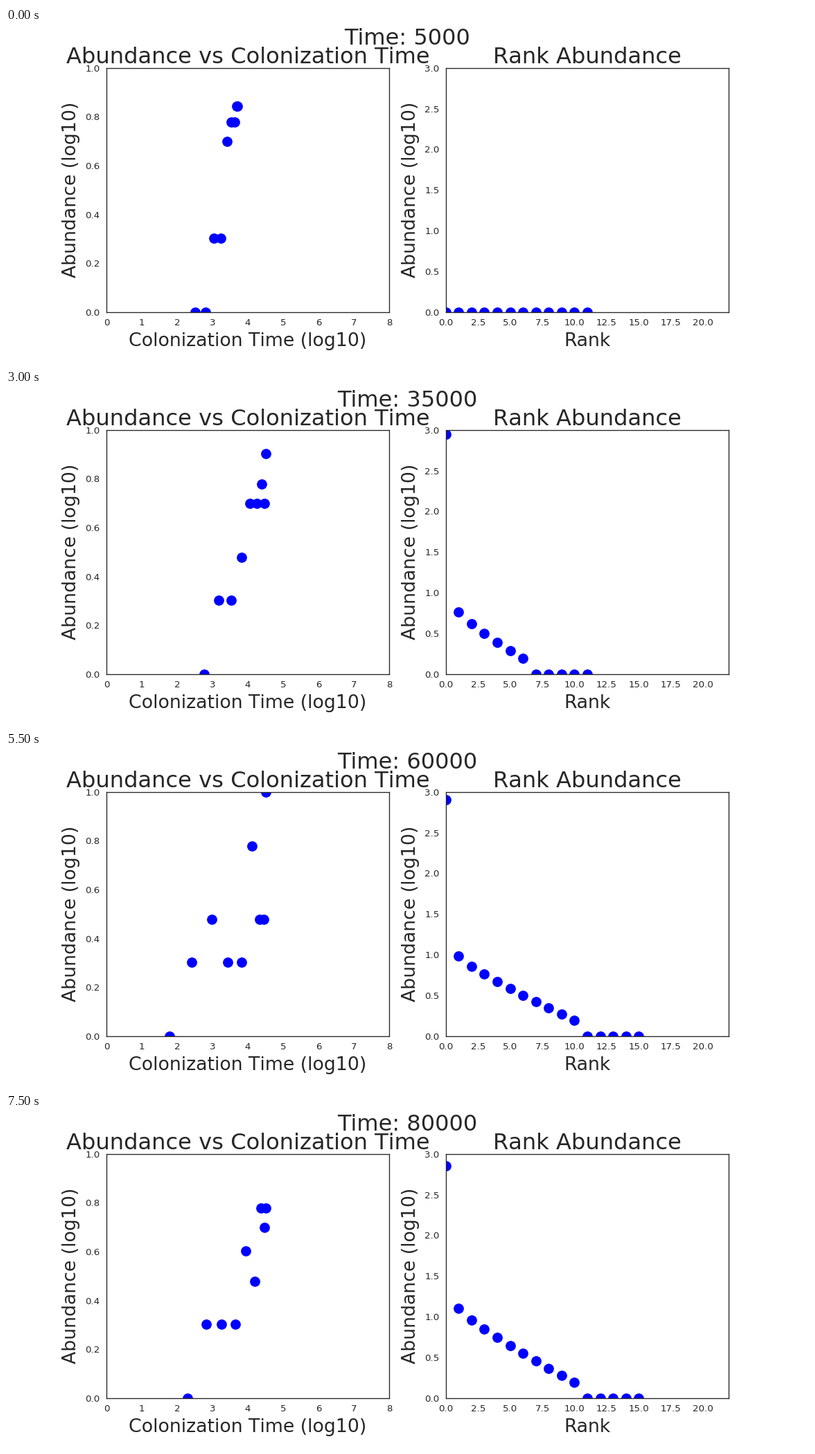
Recreate the animation shown at these times as a matplotlib script. Size 1159 px wide and 483 px high, loop 8 s.

```python
import numpy as np
import matplotlib.pyplot as plt
from matplotlib.animation import FuncAnimation

W, H, DPI = 1159, 483, 96.6
STEPS, INTERVAL = 16, 500
INK = "0.15"

# One value per step: log10 time of the first colonist, and the last rank
EARLIEST = [2.52, 1.74, 2.73, 2.54, 2.25, 2.95, 2.77, 2.9,
            1.37, 2.7, 2.4, 1.785, 2.05, 1.97, 2.01, 2.3]
LAST_RANK = [11, 10, 12, 14, 11, 10, 11, 14, 14, 15, 14, 15, 13, 13, 13, 15]


def species_at(step, count=9):
    """Colonists crowd towards the latest time; abundance rises along them."""
    rng = np.random.default_rng(step)
    u = np.linspace(0, 1, count)
    first = EARLIEST[step]
    latest = min(np.log10(5000 * (step + 1)), 4.5)
    x = first + (latest - first) * (1 - (1 - u) ** 2)
    n = np.round(1 + 9 * u * rng.uniform(0.2, 1, count))
    return x, np.log10(n)


def curve_at(step):
    """Mean log abundance by rank: one dominant, a slope, then singletons."""
    last = LAST_RANK[step]
    y = np.zeros(last + 1)
    if step > 0:
        y[0] = np.log10(915 - 0.87 * step ** 2)
        top, end = np.log10(1.2 + 0.76 * step), 0.19
        u = np.linspace(0, 1, last - 5)
        y[1:last - 4] = top + (end - top) * u ** 0.85
    return np.arange(last + 1), y


def setup(ax, title, xlabel, xlim, ylim, xticks, yticks, xfmt):
    ax.set(xlim=xlim, ylim=ylim)
    ax.set_title(title, fontsize=24, color=INK, pad=5)
    ax.set_xlabel(xlabel, fontsize=20, color=INK, labelpad=5)
    ax.set_ylabel("Abundance (log10)", fontsize=20, color=INK, labelpad=5)
    ax.set_xticks(xticks, [xfmt % v for v in xticks])
    ax.set_yticks(yticks, ["%.1f" % v for v in yticks])
    ax.tick_params(length=0, pad=7, labelsize=10, labelcolor=INK)
    for spine in ax.spines.values():
        spine.set(color=INK, linewidth=1)
    dots, = ax.plot([], [], "o", color="#0000ff", ms=11, mew=0)
    return dots


plt.rcParams["font.family"] = "DejaVu Sans"
plt.rcParams["text.kerning_factor"] = 6
fig, (left, right) = plt.subplots(
    1, 2, figsize=((W + 1e-6) / DPI, (H + 1e-6) / DPI), dpi=DPI,
    facecolor="white")
fig.subplots_adjust(left=0.125, right=0.9, bottom=0.15, top=0.88, wspace=0.2)

scatter = setup(left, "Abundance vs Colonization Time",
                "Colonization Time (log10)", (0, 8), (0, 1),
                np.arange(9), np.arange(6) / 5, "%d")
ranks = setup(right, "Rank Abundance", "Rank", (0, 22), (0, 3),
              np.arange(9) * 2.5, np.arange(7) / 2, "%.1f")
clock = fig.suptitle("", x=0.5, y=1.0, fontsize=24, color=INK)


def draw(step):
    scatter.set_data(*species_at(step))
    ranks.set_data(*curve_at(step))
    clock.set_text(f"Time: {5000 * (step + 1)}")
    return scatter, ranks, clock


anim = FuncAnimation(fig, draw, frames=STEPS, interval=INTERVAL,
                     init_func=lambda: draw(0), repeat=True, repeat_delay=0)
plt.show()
```
